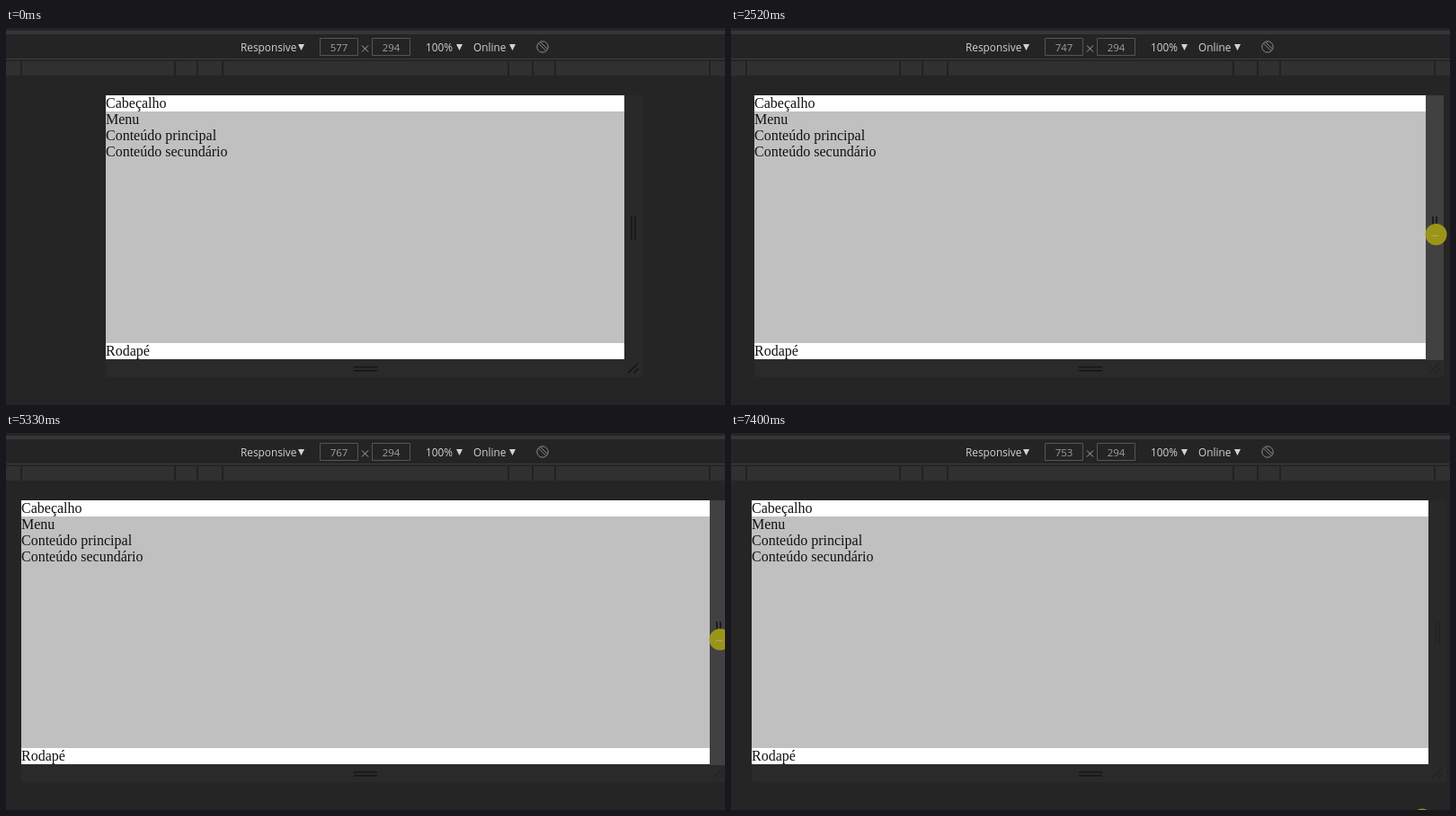
Recreate the animation shown at these times as an HTML page. Size 800 by 420 pixels, loop 7.44 s.

```html
<!DOCTYPE html>
<html lang="pt">
<head>
<meta charset="utf-8">
<title>Layout responsivo</title>
<style>
  html, body { margin: 0; width: 100%; height: 100%; overflow: hidden; background: #252525; }
  svg { display: block; width: 800px; height: 420px; }
  .ui { font: 11.8px "Open Sans", "Noto Sans", sans-serif; fill: #d2d2d2; }
  .num { font-size: 11.4px; fill: #a0a0a0; text-anchor: middle; }
  .page { font: 16px "Liberation Serif", "Times New Roman", serif; fill: #111; }
  .thin { fill: none; stroke: #8a8a8a; }
  .grip { fill: none; stroke: #151515; stroke-width: 1.6; }
</style>
</head>
<body>
<svg viewBox="0 0 800 420">
  <rect width="800" height="420" fill="#252525"/>
  <rect y="3" width="800" height="4" fill="#36363a"/>
  <rect y="7" width="800" height="27" fill="#242424"/>
  <rect y="34" width="800" height="1" fill="#3d3d3d"/>
  <rect y="37" width="800" height="16" fill="#303030"/>
  <path id="ticks" stroke="#222" stroke-width="2"/>

  <g class="ui">
    <text x="261" y="26">Responsive</text>
    <text x="467" y="26">100%</text>
    <text x="520" y="26">Online</text>
    <path d="M325 18h7l-3.5 7zM501 18h7l-3.5 7zM560 18h7l-3.5 7z"/>
    <text id="width" class="num" x="370.5" y="26">577</text>
    <text class="num" x="428.5" y="26">294</text>
  </g>
  <path d="M349.5 11.5h42v19h-42zM407.5 11.5h42v19h-42z" fill="none" stroke="#555"/>
  <path class="thin" d="M396 19.5l7 7M403 19.5l-7 7" style="stroke:#aaa"/>
  <g class="thin">
    <circle cx="597" cy="21" r="6.2"/>
    <path d="M592.5 17l8.5 8.5M594.5 15.5l8 8M597 21"/>
  </g>

  <rect id="foot" y="369" height="20" fill="#2a2a2a"/>
  <path class="grip" d="M387 377.8h26M387 381.8h26"/>
  <g id="side">
    <rect id="bar" y="75" width="20" height="295"/>
    <path id="grip" class="grip" d="M8 210v26M12 210v26"/>
    <path id="corner" class="grip" d="M4 384.5l11-11M10.5 384.5l5.5-5.5"/>
  </g>

  <g id="page">
    <rect class="fit" y="75" height="294" fill="#fff"/>
    <rect class="fit" y="93" height="258" fill="#c0c0c0"/>
    <g class="page">
      <text y="89">Cabeçalho</text>
      <text y="107">Menu</text>
      <text y="125">Conteúdo principal</text>
      <text y="143">Conteúdo secundário</text>
      <text y="365">Rodapé</text>
    </g>
  </g>

  <g id="cursor">
    <circle r="12" fill="#9b941b"/>
    <path d="M-5 1.5h8" stroke="#b3ac55" fill="none"/>
  </g>
</svg>
<script>
const LOOP = 7440, GRAB = 290, DROP = 7010;
const $ = id => document.getElementById(id);
const fits = document.querySelectorAll('.fit');

// time, left edge, right edge, shown width
const sizes = [
  [0, 111, 688, 577],
  [GRAB, 111, 688, 577],
  [720, 127, 672, 545],
  [820, 127, 672, 545],
  [1560, 31, 768, 737],
  [1820, 29, 770, 743],
  [3380, 23, 776, 753],
  [4560, 18, 781, 761],
  [5330, 17, 783, 767],
  [5480, 17, 783, 767],
  [6210, 23, 776, 753],
  [LOOP, 23, 776, 753]
];
const arrive = [[70, 640, 330], [GRAB, 696, 229]];
const leave = [[DROP, 787, 230], [7400, 769, 430], [LOOP, 767, 450]];

function sample(table, t) {
  let i = 1;
  while (i < table.length - 1 && t > table[i][0]) i++;
  const a = table[i - 1], b = table[i];
  const p = Math.max(0, Math.min(1, (t - a[0]) / (b[0] - a[0])));
  return a.slice(1).map((v, k) => v + (b[k + 1] - v) * p);
}

const move = (id, x, y) => $(id).setAttribute('transform', `translate(${x} ${y})`);

function draw(t) {
  const [l, r, w] = sample(sizes, t);
  const left = Math.round(l), right = Math.round(r);
  const held = t >= GRAB && t < DROP + 60;
  const parked = t >= DROP + 60;

  $('width').textContent = 1 + 2 * Math.round((w - 1) / 2);
  move('page', left, 0);
  fits.forEach(e => e.setAttribute('width', right - left));
  $('foot').setAttribute('x', left);
  $('foot').setAttribute('width', right - left + 20);
  move('side', right, 0);
  $('bar').setAttribute('fill', held ? '#414141' : '#292929');
  $('grip').style.stroke = parked ? '#232323' : '#171717';
  $('corner').style.stroke = t < GRAB ? '#151515' : '#242424';

  const [x, y] = t < GRAB ? sample(arrive, t)
    : t < DROP ? [Math.min(right + (t < 820 ? 8 : 11.5), 794.5), t < 1820 ? 229 : 230]
    : sample(leave, t);
  move('cursor', x, y);
  $('cursor').style.display = t < 70 ? 'none' : '';
}

$('ticks').setAttribute('d',
  [17, 188, 213, 241, 559, 586, 611, 783].map(x => `M${x} 37v16`).join(''));

const start = performance.now();
function frame() {
  draw((performance.now() - start) % LOOP);
  requestAnimationFrame(frame);
}
draw(0);
requestAnimationFrame(frame);
</script>
</body>
</html>
```
